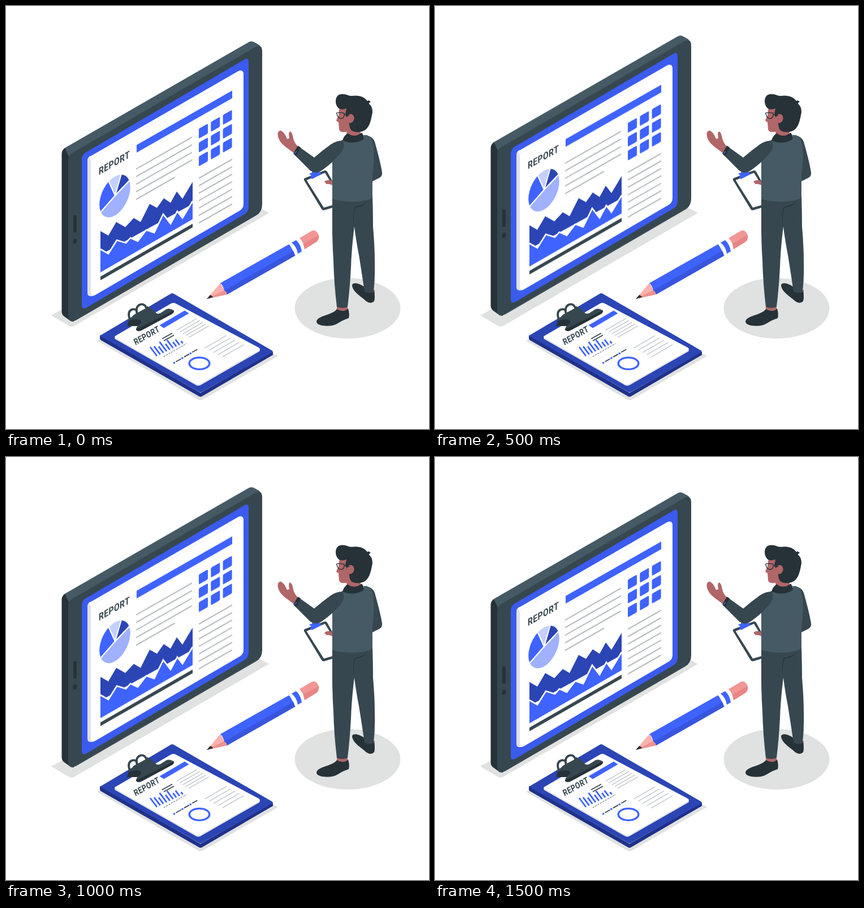
An HTML page that plays this animation: 748x748 px, repeating every 1540 ms.

```html
<!DOCTYPE html>
<html lang="en">
<head>
<meta charset="utf-8">
<title>Report</title>
<style>
  html, body { margin: 0; width: 100%; height: 100%; overflow: hidden; background: #fff; }
  svg { display: block; width: 100vw; height: 100vh; }
  text { font: 700 17.5px Roboto, sans-serif; letter-spacing: .5px; fill: #37474f; }
  .ink { fill: #263238; }
  .slate { fill: #37474f; }
  .steel { fill: #455a64; }
  .blue { fill: #3f63ff; }
  .navy { fill: #2b45b5; }
  .skin { fill: #b16668; }
  .shade { fill: #e0e1e1; }
  .paper { fill: #fff; }
  .rule { fill: none; stroke: #b7bcc0; }
  .dark { fill: none; stroke: #37474f; }
</style>
</head>
<body>
<svg viewBox="0 0 748 748" xmlns="http://www.w3.org/2000/svg">
  <defs>
    <clipPath id="disc"><ellipse cx="192.5" cy="445.7" rx="27.3" ry="34.5" transform="matrix(1 -.57 0 1 0 0)"/></clipPath>
    <path id="leaf" d="M194 583L292 526Q296 524 300 526L447 604Q451 607 447 609L344 668Q340 670 336 668L194 587Q190 585 194 583Z"/>
  </defs>

  <!-- floor shadows -->
  <path class="shade" d="M80 547L100 536L440 352L465 366L120 566Q116 568 112 566Z"/>
  <ellipse class="shade" cx="604" cy="534.5" rx="93.5" ry="53.5"/>
  <path class="shade" d="M161 592L290 520L481 619L348 696Q344 698 340 696Z"/>

  <g id="tablet">
    <path class="ink" d="M98.500 262Q98.500 255 104 251L124 258L120 558Q115 558 110 554L103 549Q98.500 546 98.500 540Z"/>
    <path class="steel" d="M104 251L429 64Q434 61 439 64L448 69L452 76L112 268Z"/>
    <path class="slate" d="M110 272Q110 264 117 260L440 73Q453 66 453 80V351Q453 364 443 370L125 555Q110 563 110 547Z"/>
    <rect class="ink" x="119" y="370" width="6" height="31" rx="3"/>
    <ellipse class="ink" cx="122" cy="416" rx="3.300" ry="4.800" transform="rotate(15 122 416)"/>
    <path fill="#3a5bee" d="M134 272Q134 263 141 259L421 95Q429 90 429 99V355Q429 364 422 368L143 533Q134 538 134 529Z"/>
    <path fill="#dfe1e4" d="M144 273Q144 268 149 265L156 270V512Q144 516 144 507Z"/>
    <path class="paper" d="M147 267L411 115Q415 113 418 115Q420 117 420 121V350Q420 358 413 362L158 511Q150 515 150 507V274Z"/>
    <path d="M151 271L417 118" fill="none" stroke="#e3e4e8" stroke-dasharray="3 2"/>

    <g id="page" transform="matrix(1 -.57 0 1 0 0)">
      <text transform="translate(164 392.500) scale(.8 1)">REPORT</text>
      <rect class="blue" x="231" y="377.500" width="169" height="13.500"/>
    </g>

    <g clip-path="url(#disc)" stroke="#fff" stroke-width="2">
      <path fill="#9fb1ff" d="M193 335L222 305L240 400H140L166 366Z"/>
      <path class="blue" d="M193 335L179 304L140 290V396L166 366Z"/>
      <path fill="#c5d0ff" d="M193 335L178 302L208 285Z"/>
      <path class="navy" d="M193 335L206 290L230 296Z"/>
    </g>

    <path class="navy" d="M167 398L181 406L195 382L211 391L226 375L238 382L254 350L267 357L279 340L291 348L302 328L312 341L330 311V350L167 440Z"/>
    <path class="blue" d="M167 430L181 438L196 414L212 419L220 410L233 416L248 396L262 401L278 368L291 385L303 363L312 375L330 345V377L167 471Z"/>
    <path fill="none" stroke="#fff" stroke-width="2.600" d="M167 430L181 438L196 414L212 419L220 410L233 416L248 396L262 401L278 368L291 385L303 363L312 375L330 345"/>
    <path class="slate" d="M167 478.500L330 385V391.500L167 485Z"/>
  </g>

  <!-- clipboard on the floor -->
  <path fill="#1f3189" d="M166 582L344 684L472 611V617L347 690Q344 692 341 690L168 591Q166 590 166 588Z"/>
  <path class="navy" d="M166 583L291 509Q294 507 297 509L470 609Q473 611 470 613L347 682Q344 684 341 682Z"/>
  <use href="#leaf" y="2.500" fill="#dfe1e4"/>
  <use href="#leaf" class="paper"/>
  <g id="sheet">
    <text transform="matrix(.79 -.45 .45 1 229 600)" style="font-size:14px">REPORT</text>
    <path class="blue" d="M271.500 564.500L316 538.500L323.500 543.500L279 569.500Z"/>
    <path class="dark" stroke-width="1.800" d="M276 588.500L294 578.500M279 592L297 582"/>
    <path class="dark" stroke-dasharray="3 2" d="M279 620L319 597"/>
    <ellipse cx="342" cy="632" rx="17.800" ry="10.400" fill="none" stroke="#3f63ff" stroke-width="3.400"/>
  </g>
  <path class="ink" d="M214 566L217 556L232 546L258 552L238 566Z"/>
  <path class="slate" d="M217 556L228 543L250 531Q258 534 263 541Q267 546 273 543L284 536Q290 534 296 538V541L240 572L230 573Q230 567 236 563Q241 560 238 556Q232 552 217 556Z"/>
  <path class="ink" d="M230 571L240 567L297 538Q298 542 293 545L241 573Q234 577 230 573Z"/>
  <g fill="#fff" stroke="#37474f" stroke-width="3.800">
    <path d="M219 554Q214 541 222 537Q231 533 234 546Z"/>
    <path d="M232 545Q228 532 237 528Q246 525 249 537Z"/>
  </g>
  <path class="slate" d="M217 556L226 546L250 533L255 541L234 553Z"/>

  <!-- pencil -->
  <path fill="#fbb1ae" d="M355 518L379 490L391 510Z"/>
  <path fill="#ee9290" d="M355 518L387 502L391 510Z"/>
  <path class="ink" d="M355 518L361 511Q365 512 366 515Z"/>
  <path class="blue" d="M379 490L501 421L512 441L391 510Q390 504 386 503Q384 494 379 490Z"/>
  <path fill="#3855dc" d="M386 503L508 433L512 441L391 510Q390 505 386 503Z"/>
  <path class="paper" d="M500 421L519 410Q526 417 528 430L511 441Q508 428 500 421Z"/>
  <path class="blue" d="M505 418.500L513 414Q521 421 523 434L516 438Q514 425 505 418.500Z"/>
  <path fill="#f29696" d="M519 410.500L540 398Q547 394 552 403Q555 412 549 417L528 430Q526 417 519 410.500Z"/>
  <path fill="#e88585" d="M526 420L553 405Q554 413 549 417L528 430Z"/>

  <!-- presenter -->
  <path class="slate" d="M527 308Q526 305 529 304L563 291Q566 290 568 293L583 320V355L563 361Q560 362 558 359Z"/>
  <path class="paper" d="M531.500 308L564 295L583 326V350.500L562 356.500Z"/>
  <path class="blue" d="M536 296L541 295Q541 290 547 290Q551 290 551 294L556 293L557 298L541 306L538 303L540 300Z"/>
  <path class="skin" d="M563 311Q567 307 573 308L580 311V319Q573 314 567 315Z"/>

  <path class="skin" d="M585 528H604V543H585ZM633 502H652V515H638Z"/>
  <path class="ink" d="M585 536C577 547 551 547 549 558C549 565 565 567 577 565C587 563 592 556 606 552Q608 544 605 535Q597 543 585 536Z"/>
  <path class="ink" d="M612 494C612 488 624 489 634 497Q637 508 651 505Q653 516 651 522Q645 528 637 522C630 515 613 506 612 494Z"/>
  <path class="slate" d="M577 338L648 334Q649 365 649 390Q652 425 652 450Q653 480 650 506Q642 509 634 505Q628 465 624 440Q619 415 616 390Q611 430 610 462Q608 500 604 532Q594 536 585 532Q580 490 579 450Q577 420 577 390Z"/>
  <path class="ink" d="M616 392Q613 370 618 356Q634 355 639 345Q633 353 617 355Q612 370 616 392Z"/>

  <path class="slate" d="M632 228Q648 229 652 240C657 258 663 280 665 294Q666 301 660 304L646 311V260Z"/>
  <path class="steel" d="M594 237Q615 243 637 228Q648 231 650 250Q652 270 648 300V338Q640 345 614 346Q590 346 577 341V262Z"/>
  <path class="skin" d="M602 218L626 215L628 232Q615 240 603 233Z"/>
  <path class="ink" d="M595 238Q597 230 604 225Q616 234 629 224Q634 230 632 236Q614 246 595 238Z"/>
  <path class="slate" d="M517 248L545 268Q560 255 574 245Q584 238 595 238Q601 248 592 260Q577 278 558 291Q548 298 538 291L509 262Z"/>
  <path class="skin" d="M517 249Q510 243 508 234Q506 222 502 222Q499 223 501 234L497 235Q492 222 485 220Q479 222 481 231Q483 240 493 248L509 260Z"/>
  <path class="ink" d="M508 261L516 247L521 250L513 265Z"/>
  <path d="M510 261L514 257" stroke="#3f63ff" stroke-width="1.500"/>

  <path class="skin" d="M590 179Q588 190 588 194L584 202Q585 205 588 205L589 218Q590 223 597 223L615 221L622 190L605 176Z"/>
  <path class="ink" d="M590 182C580 176 581 157 592 156C602 155 604 159 611 159C625 157 634 161 639 168Q642 165 645 170Q642 170 642 173Q648 177 648 188C645 203 643 223 622 223Q610 223 608 215L606 203L600 192L602 181Q596 184 590 182Z"/>
  <ellipse class="skin" cx="609" cy="199" rx="6.500" ry="8" transform="rotate(15 609 199)"/>
  <path fill="none" stroke="#263238" stroke-width="1.300" d="M584 190Q586 187 598 189.500Q599 199 592 199Q586 198 585 190M598 192L607 194"/>
</svg>

<script>
const NS = 'http://www.w3.org/2000/svg';
const $ = id => document.getElementById(id);

function add(parent, tag, attrs) {
  const el = document.createElementNS(NS, tag);
  for (const key in attrs) el.setAttribute(key, attrs[key]);
  parent.append(el);
}

// Parallel text rules: each starts one step (sx, sy) after the last.
function rules(parent, count, x, y, dx, dy, sx, sy, width) {
  for (let i = 0; i < count; i++) {
    add(parent, 'path', {
      class: 'rule', 'stroke-width': width, 'stroke-linecap': 'round',
      d: `M${x + i * sx} ${y + i * sy}l${dx} ${dy}`
    });
  }
}

const page = $('page'), sheet = $('sheet');

rules(page, 4, 231, 419.5, 97, 0, 0, 13.4, 2.4);
rules(page, 1, 231, 473.1, 67, 0, 0, 0, 2.4);
rules(page, 7, 342, 499, 57, 0, 0, 13.2, 2.4);
for (let i = 0; i < 9; i++) {
  add(page, 'rect', {
    class: 'blue', x: 341 + i % 3 * 21.3, y: 411.5 + Math.floor(i / 3) * 24.5,
    width: 16, height: 17.5, rx: 1.8
  });
}

rules(sheet, 5, 302, 573, 35, -20, 5.4, 3.2, 1.2);
rules(sheet, 5, 352, 604.5, 37, -21.5, 7.7, 4, 1.2);
[20, 18, 14, 21, 13, 18, 10, 12, 5].forEach((len, i) => add(sheet, 'path', {
  stroke: '#3f63ff', 'stroke-width': 2.8,
  d: `M${267 + i * 5.7} ${619 - i * 2.8}l${-len * .6} ${-len * .8}`
}));
for (let i = 0; i < 3; i++) {
  const x = 297.5 + i * 14.4, y = 631 - i * 8.4;
  add(sheet, 'circle', { class: 'blue', cx: x, cy: y, r: 1.8 });
  add(sheet, 'path', { class: 'dark', 'stroke-width': 1.8, d: `M${x + 3} ${y - 2}l9 -5` });
}

const loop = 1540;
const rise = [[0, 0], [710, -14.6], [1490, 0], [loop, 0]];
$('tablet').animate(
  rise.map(([t, y]) => ({ offset: t / loop, transform: `translateY(${y}px)` })),
  { duration: loop, iterations: Infinity, easing: 'steps(37)' }
);
</script>
</body>
</html>
```
